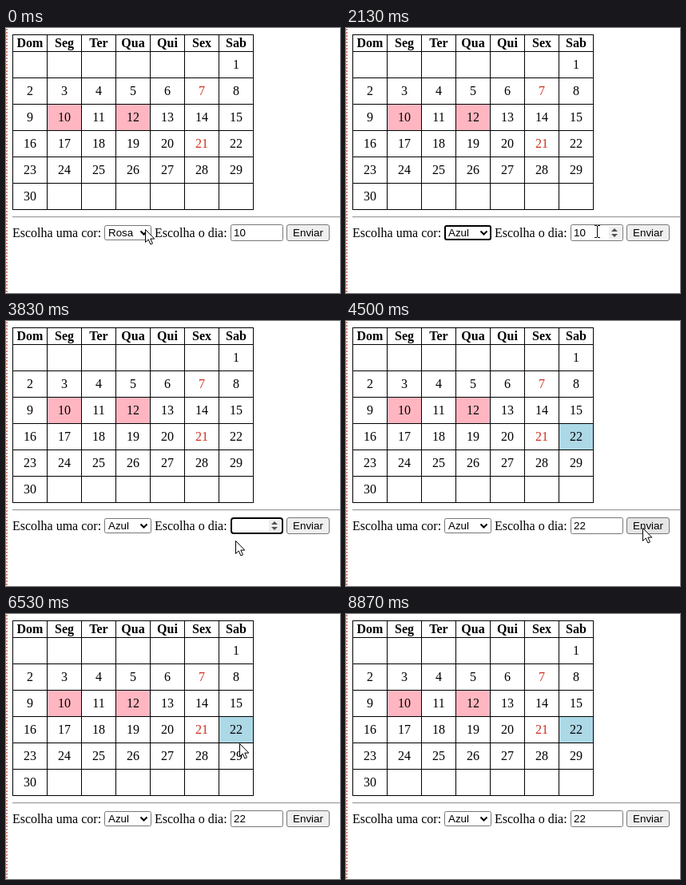
An HTML page with a canvas that plays this animation: 418 px wide and 332 px high, repeating every 8.91 s.

```html
<!DOCTYPE html>
<html lang="pt">
<head>
<meta charset="utf-8">
<title>Calendário</title>
<style>
html, body { margin: 0; width: 100%; height: 100%; overflow: hidden; background: #fff; }
canvas { display: block; width: 418px; height: 332px; }
</style>
</head>
<body>
<canvas id="stage" width="418" height="332"></canvas>
<script>
const ctx = document.getElementById('stage').getContext('2d');
const LOOP = 8910;
const SERIF = '16px "Liberation Serif", "Times New Roman", serif';
const SANS = '13.333px "Liberation Sans", Arial, sans-serif';
const DAYS = ['Dom', 'Seg', 'Ter', 'Qua', 'Qui', 'Sex', 'Sab'];
const COLORS = ['Azul', 'Verde', 'Rosa', 'Roxo'];
const COL = 43, ROW = 33, LEFT = 8, TOP = 29;
const GREY = '#767676', BUTTON = '#efefef';

const OPEN = 450, CHOOSE = 1520, FOCUS = 2300, CLEAR = 3480, TYPE = 3800, SEND = 4480;

// Each move starts at the given time and lasts GLIDE ms.
const GLIDE = 420;
const HOME = { x: 174, y: 252 };
const MOVES = [
  { at: 480, x: 168, y: 292 },
  { at: 1060, x: 161, y: 274 },
  { at: 1640, x: 314, y: 255 },
  { at: 2340, x: 286, y: 288 },
  { at: 3250, x: 287, y: 275 },
  { at: 4000, x: 371, y: 259 },
  { at: 5850, x: 292, y: 162 },
  { at: 7500, x: 424, y: 196 }
];

function pointerAt(t) {
  let { x, y } = HOME;
  for (const m of MOVES) {
    const u = Math.max(0, Math.min(1, (t - m.at) / GLIDE));
    const k = u * u * (3 - 2 * u);
    x += (m.x - x) * k;
    y += (m.y - y) * k;
  }
  return { x: Math.round(x), y: Math.round(y) };
}

function rect(x, y, w, h, color) {
  ctx.fillStyle = color;
  ctx.fillRect(x, y, w, h);
}

function text(s, x, y, font, color = '#000', align = 'left') {
  ctx.font = font;
  ctx.fillStyle = color;
  ctx.textAlign = align;
  ctx.fillText(s, x, y);
}

function paint(fill, stroke, line = 1) {
  ctx.fillStyle = fill;
  ctx.fill();
  if (!stroke) return;
  ctx.strokeStyle = stroke;
  ctx.lineWidth = line;
  ctx.stroke();
}

function box(x, y, w, h, r, fill, stroke, line) {
  ctx.beginPath();
  ctx.roundRect(x, y, w, h, r);
  paint(fill, stroke, line);
}

function cell(day) {
  const n = day + 5;
  return { x: LEFT + (n % 7) * COL, y: TOP + Math.floor(n / 7) * ROW };
}

function fillDay(day, color) {
  const { x, y } = cell(day);
  rect(x, y, COL, ROW, color);
}

function drawCalendar(sent) {
  fillDay(10, '#ffb6c1');
  fillDay(12, '#ffb6c1');
  if (sent) fillDay(22, '#add8e6');

  rect(LEFT, 8, 7 * COL + 1, 1, '#000');
  for (let r = 0; r < 7; r++) rect(LEFT, TOP + r * ROW, 7 * COL + 1, 1, '#000');
  for (let c = 0; c < 8; c++) rect(LEFT + c * COL, 8, 1, 220, '#000');

  DAYS.forEach((d, c) => text(d, LEFT + 22 + c * COL, 24, 'bold ' + SERIF, '#000', 'center'));
  for (let d = 1; d <= 30; d++) {
    const { x, y } = cell(d);
    const holiday = d === 7 || d === 21;
    text(d, x + 22, y + 22, SERIF, holiday ? '#d03020' : '#000', 'center');
  }
}

function drawSelect(value, focused) {
  if (focused) box(124, 248, 57, 17, 2, '#fff', '#000', 2);
  else box(123.5, 247.5, 58, 18, 2, '#fff', GREY);
  text(value, 128, 261, SANS);
  ctx.beginPath();
  ctx.moveTo(168.5, 254.5);
  ctx.lineTo(172.5, 258.5);
  ctx.lineTo(176.5, 254.5);
  ctx.strokeStyle = '#000';
  ctx.lineWidth = 2;
  ctx.stroke();
}

function triangle(x, y, dir) {
  ctx.beginPath();
  ctx.moveTo(x - 4, y);
  ctx.lineTo(x, y + 4 * dir);
  ctx.lineTo(x + 4, y);
  paint('#505050');
}

function drawInput(value, focused, spinner) {
  if (focused) box(282, 247, 64, 19, 3, '#fff', '#000', 2);
  else box(281.5, 246.5, 65, 20, 2, '#fff', GREY);
  text(value, 285, 261, SANS);
  if (!spinner) return;
  rect(329, 249, 15, 15, BUTTON);
  triangle(336, 255, -1);
  triangle(336, 258, 1);
}

function drawMenu(pointerY) {
  const top = 267, step = 16.6;
  const active = pointerY < top ? 2 : Math.floor((pointerY - top) / step);
  ctx.save();
  ctx.shadowColor = 'rgba(60, 60, 110, .38)';
  ctx.shadowBlur = 28;
  ctx.shadowOffsetY = 6;
  box(124, 266, 58, 76, 6, '#fff');
  ctx.restore();
  box(123.5, 266.5, 58, 76, 6, '#fff', '#c4c4c8');
  COLORS.forEach((name, i) => {
    const y = top + Math.round(i * step);
    if (i === active) rect(124, y, 58, 16, '#1967d2');
    text(name, 128, y + 12, SANS, i === active ? '#fff' : '#000');
  });
}

function drawArrow(x, y) {
  ctx.save();
  ctx.translate(x + .5, y + .5);
  ctx.beginPath();
  ctx.moveTo(0, 0);
  ctx.lineTo(0, 16);
  ctx.lineTo(3.7, 12.5);
  ctx.lineTo(6.4, 18.5);
  ctx.lineTo(9, 17.4);
  ctx.lineTo(6.3, 11.6);
  ctx.lineTo(11.3, 11.6);
  ctx.closePath();
  paint('#fff', '#000');
  ctx.restore();
}

function drawBeam(x, y) {
  rect(x, y - 7, 1, 14, '#000');
  for (const dy of [-8, 7]) {
    rect(x - 3, y + dy, 3, 1, '#000');
    rect(x + 1, y + dy, 3, 1, '#000');
  }
}

function draw(t) {
  const p = pointerAt(t);
  const inside = (x, w) => p.x >= x && p.x < x + w && p.y >= 246 && p.y < 267;
  const overInput = inside(281, 66);
  const overButton = inside(351, 54);
  const editing = t >= FOCUS && t < SEND;
  const typed = '22'.slice(0, Math.max(0, Math.floor((t - TYPE) / 150)));

  rect(0, 0, 418, 332, '#fff');
  for (let y = 1; y < 332; y += 4) rect(0, y, 2, 2, '#d98a78');

  drawCalendar(t >= SEND);
  rect(8, 236, 410, 1, '#9a9a9a');
  rect(8, 237, 410, 1, '#eee');

  text('Escolha uma cor:', 8, 262, SERIF);
  drawSelect(t < CHOOSE ? 'Rosa' : 'Azul', t >= CHOOSE && t < FOCUS);
  text('Escolha o dia:', 186, 262, SERIF);
  drawInput(t < CLEAR ? '10' : typed, editing, editing || overInput);
  box(351.5, 246.5, 53, 20, 2.5, overButton ? '#e5e5e5' : BUTTON, GREY);
  text('Enviar', 378, 261, SANS, '#000', 'center');

  if (t >= OPEN && t < CHOOSE) drawMenu(p.y);
  if (overInput) drawBeam(p.x, p.y);
  else drawArrow(p.x, p.y);
}

const start = performance.now();
function tick() {
  draw((performance.now() - start) % LOOP);
  requestAnimationFrame(tick);
}
tick();
</script>
</body>
</html>
```
